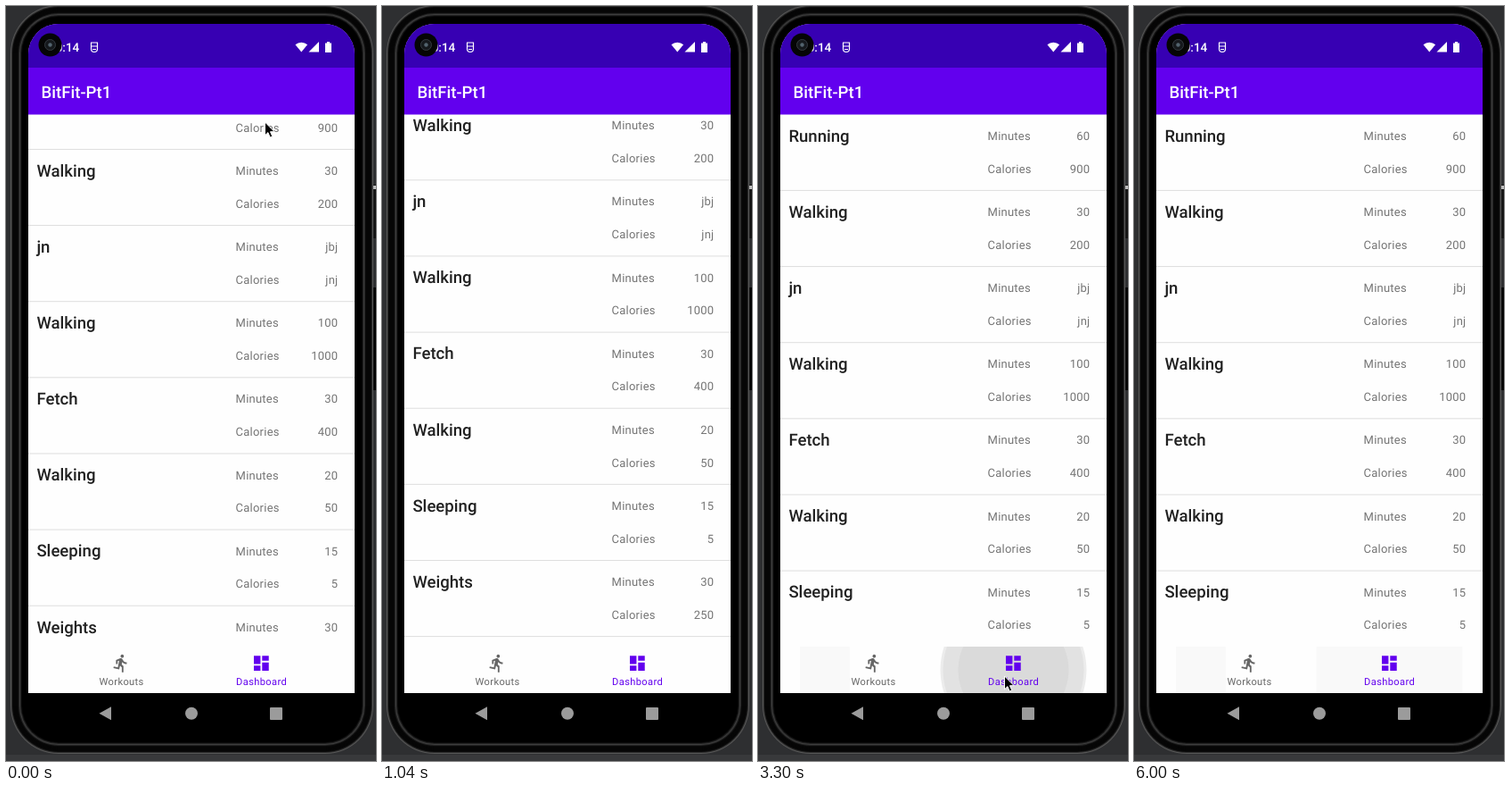
Write an HTML page that moves like this. It is 415 by 845 pixels and loops after 7.05 s.

```html
<!DOCTYPE html>
<html lang="en">
<head>
<meta charset="utf-8">
<title>Workout list</title>
<style>
  html, body { margin: 0; width: 100%; height: 100%; overflow: hidden; background: #2e2f31; }
  svg { display: block; width: 415px; height: 845px; font-family: Roboto, sans-serif; text-rendering: geometricPrecision; }
  .title { font-size: 18.6px; font-weight: 500; fill: #212121; }
  .cell { font-size: 13px; letter-spacing: .23px; fill: #757575; }
  .end { text-anchor: end; }
  .tab { font-size: 11.1px; letter-spacing: .37px; text-anchor: middle; }
</style>
</head>
<body>
<svg viewBox="0 0 415 845">
  <defs>
    <clipPath id="screen"><path d="M25 769V54a34 34 0 0 1 34-34H357a34 34 0 0 1 34 34V769z"/></clipPath>
    <clipPath id="listBox"><rect x="25" y="121.5" width="366" height="593.5"/></clipPath>
    <clipPath id="navBox"><rect x="25" y="717" width="366" height="52"/></clipPath>
  </defs>

  <rect width="415" height="845" fill="#2e2f31"/>
  <rect y="838" width="415" height="7" fill="#38393b"/>
  <rect x="410" y="200" width="5" height="60" fill="#161616"/>
  <rect x="412" y="201" width="3" height="4" fill="#bbb"/>
  <rect x="410" y="315" width="5" height="115" fill="#050505"/>
  <g id="body"></g>

  <g clip-path="url(#screen)">
    <rect x="25" y="20" width="366" height="749" fill="#fefefe"/>
    <rect x="25" y="20" width="366" height="101.5" fill="#6200ee"/>
    <rect x="25" y="20" width="366" height="49" fill="#3700b3"/>
  </g>
  <g fill="#fff">
    <text x="82.3" y="51" font-size="13.5" font-weight="500" class="end">10:14</text>
    <text x="39.6" y="103" font-size="18.6" font-weight="500">BitFit-Pt1</text>
    <path d="M324.5 43.3a10 10 0 0 1 13.6 0L331.3 51.5z"/>
    <path d="M351 40V51.5H339.5z"/>
    <path d="M358 41.5h2v-1.5h3v1.5h2V52h-7z"/>
    <path d="M95 41h8M95.500 41v7a3.500 3.500 0 0 0 7 0v-7M95 45h8M97 48.500h4" fill="none" stroke="#fff" stroke-width="1.2"/>
  </g>
  <circle cx="49.5" cy="43.5" r="13" fill="#050505"/>
  <circle cx="49.5" cy="43.5" r="6" fill="#15181c" stroke="#343a40"/>
  <circle cx="49.5" cy="43.5" r="2.2" fill="#53646f"/>

  <g id="list" clip-path="url(#listBox)"></g>

  <g clip-path="url(#navBox)">
    <g id="tints" fill="#f9f9f9"></g>
    <g id="ripple"></g>
  </g>
  <g id="workouts">
    <path transform="translate(117.8 724.4) scale(.93)" d="M13.49 5.48c1.1 0 2-.9 2-2s-.9-2-2-2-2 .9-2 2 .9 2 2 2zm-3.6 13.9l1-4.4 2.1 2v6h2v-7.5l-2.1-2 .6-3c1.3 1.5 3.3 2.5 5.5 2.5v-2c-1.9 0-3.5-1-4.3-2.4l-1-1.6c-.4-.6-1-1-1.7-1-.3 0-.5.1-.8.1l-5.2 2.2v4.7h2v-3.4l1.8-.7-1.6 8.1-4.9-1-.4 2 7 1.4z"/>
    <text x="129.6" y="760" class="tab">Workouts</text>
  </g>
  <g id="dashboard">
    <path transform="translate(275.2 724.4) scale(.93)" d="M3 13h8V3H3v10zm0 8h8v-6H3v6zm10 0h8V11h-8v10zm0-18v6h8V3h-8z"/>
    <text x="286.6" y="760" class="tab">Dashboard</text>
  </g>

  <g fill="#9b9b9b">
    <path d="M104.5 791.8L118 784.3V799.3z"/>
    <circle cx="208" cy="791.8" r="7"/>
    <rect x="296" y="785" width="14" height="14" rx="1"/>
  </g>

  <path id="cursor" d="M0 0V14.8L3.4 11.6 5.7 17 8.300 15.900 6 10.700H10.700z" stroke="#fff" stroke-linejoin="round"/>
</svg>

<script>
const LOOP = 7050, STEP = 57.7;
const TOP = 121.8, BOTTOM = 714.5, PITCH = 85.13;
const PURPLE = '#6200ee', GREY = '#666';
const $ = id => document.getElementById(id);
const clamp = p => Math.max(0, Math.min(1, p));
const easeOut = p => 1 - (1 - p) ** 2;
const mix = (a, b, p) => a + (b - a) * p;

function set(el, attrs) {
  for (const key in attrs) el.setAttribute(key, attrs[key]);
  return el;
}
function add(parent, tag, attrs = {}, text = '') {
  const el = set(document.createElementNS('http://www.w3.org/2000/svg', tag), attrs);
  el.textContent = text;
  return parent.appendChild(el);
}

// Phone shell: nested outlines with two lighter ridges
for (let i = 0; i < 14; i++) {
  const tone = Math.round(6 + 80 * Math.exp(-i * i / 1.5) + 55 * Math.exp(-((i - 10) ** 2) / 1.5));
  add($('body'), 'rect', {
    x: 5 + i, y: i - 1, width: 407 - 2 * i, height: 838 - 2 * i, rx: 54 - i,
    fill: i < 13 ? `rgb(${tone},${tone},${tone})` : '#000'
  });
}

const workouts = [
  ['Running', '60', '900'], ['Walking', '30', '200'], ['jn', 'jbj', 'jnj'],
  ['Walking', '100', '1000'], ['Fetch', '30', '400'], ['Walking', '20', '50'],
  ['Sleeping', '15', '5'], ['Weights', '30', '250'], ['Push Ups', '15', '150'],
  ['Sit Ups', '15', '100'], ['Pull Ups', '30', '300'], ['Planks', '10', '50\u00a0\u00a0']
];
const rows = workouts.map(([name, minutes, calories]) => {
  const row = add($('list'), 'g');
  const cells = (label, value, y) => {
    add(row, 'text', { x: 257.6, y, class: 'cell' }, label);
    add(row, 'text', { x: 372.4, y, class: 'cell end' }, value);
  };
  add(row, 'text', { x: 34.4, y: 29.9, class: 'title' }, name);
  cells('Minutes', minutes, 28.1);
  cells('Calories', calories, 64.9);
  add(row, 'rect', { x: 25, y: PITCH - 1, width: 366, height: 1, fill: '#dedede' });
  return row;
});

// Each fling runs into an end of the list, which stretches and relaxes
const MAX_SCROLL = TOP + PITCH * rows.length - BOTTOM;
const flings = [
  { at: 115, time: 170, from: 46, to: MAX_SCROLL },
  { at: 890, time: 283, from: MAX_SCROLL, to: 0 }
];
const STRETCH = .035, RELAX = 430;

function drawList(t) {
  const now = Math.floor(t / STEP) * STEP;
  const { at, time, from, to } = flings[now < flings[1].at ? 0 : 1];
  const offset = mix(from, to, easeOut(clamp((now - at) / time)));
  const rest = now - at - time;
  const stretch = rest < 0 ? 0 : STRETCH * (1 - clamp(rest / RELAX)) ** 2;
  const edge = to ? BOTTOM : TOP;
  const place = i => {
    const d = TOP + i * PITCH - offset - edge;
    return edge + d * (1 + stretch * (1 - Math.abs(d) / 1500));
  };
  rows.forEach((row, i) => {
    const y = place(i), scale = (place(i + 1) - y) / PITCH;
    set(row, { transform: `translate(0 ${y}) scale(1 ${scale})` });
  });
}

const moves = [
  { at: 890, end: 1040, x: 297, y: 850 },
  { at: 1420, end: 1770, x: 136.5, y: 753 },
  { at: 2460, end: 2690, x: 276.5, y: 750 },
  { at: 3530, end: 4120, x: 156.5, y: 743.5, sag: 12 },
  { at: 4560, end: 4900, x: 290, y: 757 },
  { at: 5640, end: 6000, x: 302, y: 850 }
];
function cursorAt(t) {
  let x = 290.5, y = 130;
  for (const move of moves) {
    const p = easeOut(clamp((t - move.at) / (move.end - move.at)));
    x = mix(x, move.x, p);
    y = mix(y, move.y, p) + (move.sag || 0) * Math.sin(Math.PI * p);
  }
  return { x, y };
}

// Taps alternate between the two tabs
const GROW = 260, HOLD = 500, FADE = 150, RADIUS = 82, TAB_Y = 743;
const taps = [2030, 2830, 4240, 5160].map((at, i) => ({
  at, end: at + HOLD + FADE, left: i % 2 === 0, x: i % 2 ? 286.5 : 129, point: cursorAt(at)
}));
const rings = [.07, .045, .02, .02].map(a => add($('ripple'), 'circle', { 'fill-opacity': a }));
const tints = taps.map(() => add($('tints'), 'rect', { y: 717, height: 52 }));

function drawRipple(t) {
  const tap = taps.find(p => t >= p.at && t < p.end);
  set($('ripple'), { opacity: tap ? clamp((tap.end - t) / FADE) : 0 });
  if (!tap) return;
  const p = clamp((t - tap.at) / GROW), spread = 1 - p, r = RADIUS - 40 * spread;
  [r, r - 3 - 7 * spread, r - 20 + 13 * spread, r - 20].forEach((radius, i) => set(rings[i], {
    cx: mix(tap.point.x, tap.x, p), cy: mix(tap.point.y, TAB_Y, p), r: radius
  }));
}

// A faint tint outlives each ripple; the next tap leaves only its outer edge
function drawTints(t) {
  taps.forEach((tap, i) => {
    const next = taps[i + 1], last = taps[i + 2];
    const width = next && t >= next.at ? 56 : 2 * RADIUS;
    const shown = t >= tap.end && t < (last ? last.end : LOOP);
    set(tints[i], { x: tap.left ? tap.x - RADIUS : tap.x + RADIUS - width, width, opacity: +shown });
  });
}

function draw(t) {
  drawList(t);
  drawRipple(t);
  drawTints(t);
  const pressed = taps.filter(p => t >= p.at + STEP).pop();
  const onWorkouts = Boolean(pressed && pressed.left);
  set($('workouts'), { fill: onWorkouts ? PURPLE : GREY });
  set($('dashboard'), { fill: onWorkouts ? GREY : PURPLE });
  const { x, y } = cursorAt(t);
  set($('cursor'), { transform: `translate(${x} ${y})` });
}

const start = performance.now();
function tick() {
  draw((performance.now() - start) % LOOP);
  requestAnimationFrame(tick);
}
tick();
</script>
</body>
</html>
```
